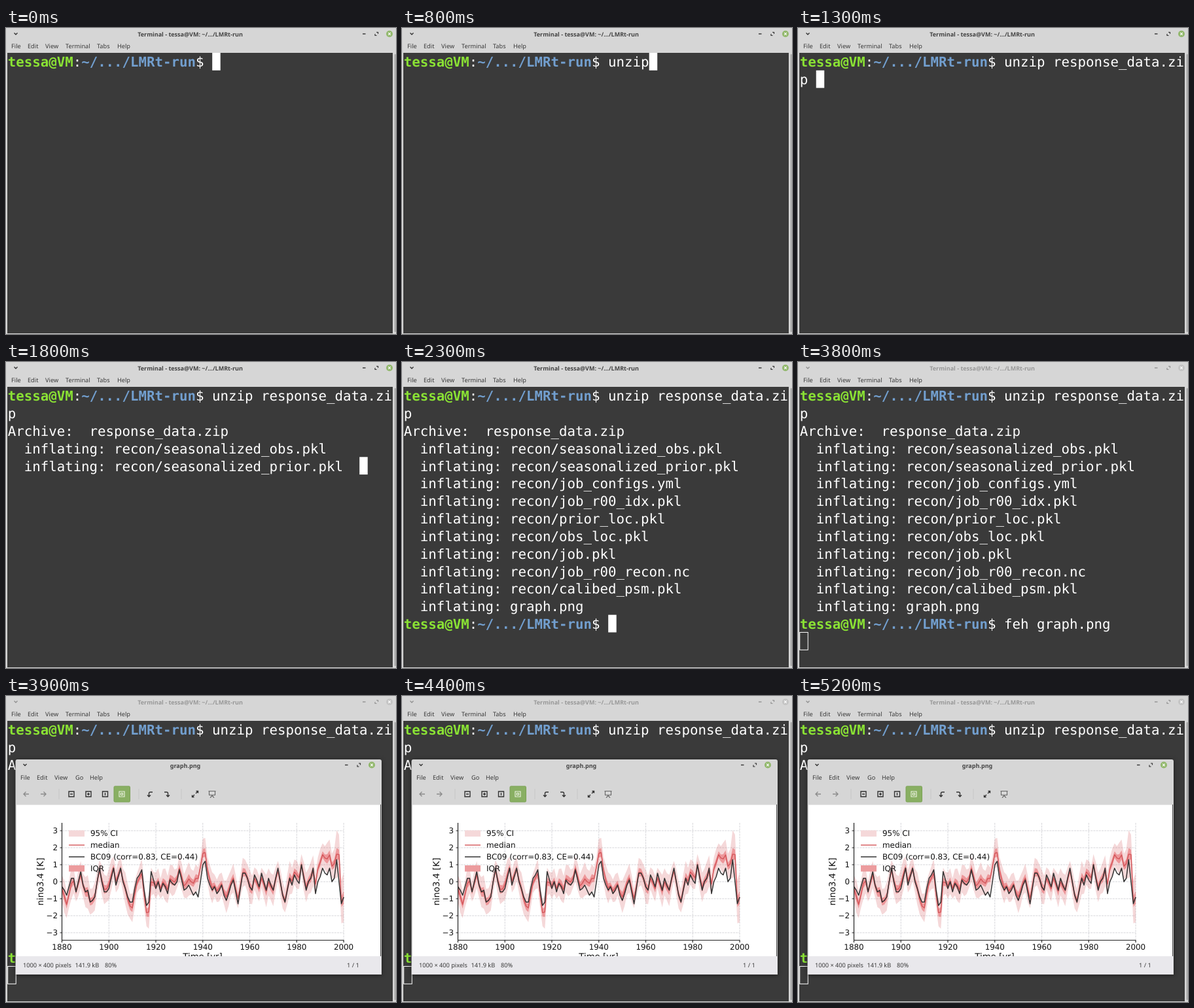
Recreate the animation shown at these times as an HTML page. Size 596 px wide and 468 px high, loop 5.3 s.

```html
<!DOCTYPE html>
<html lang="en">
<head>
<meta charset="utf-8">
<title>Terminal session</title>
<style>
html, body { margin: 0; width: 100%; height: 100%; overflow: hidden; background: #d6d6d6; }
svg { display: block; width: 596px; height: 468px; text-rendering: geometricPrecision; }
text { white-space: pre; }
.ui { font: 9.2px "Noto Sans", "Open Sans", sans-serif; fill: #3a3a3a; }
.title { font-size: 9px; font-weight: 600; text-anchor: middle; fill: #444; }
.term { font: 20.765px "DejaVu Sans Mono", monospace; fill: #fff; }
.b { font-weight: 700; }
.plot { font: 11.9px "DejaVu Sans", sans-serif; fill: #111; }
.axis { font-size: 13.3px; text-anchor: middle; }
.icon { fill: none; stroke: #333; stroke-width: 1.4; }
</style>
</head>
<body>
<svg id="stage" viewBox="0 0 596 468"></svg>
<script>
const LOOP = 5300, COL = 12.5, ROW = 26.82, LEFT = 2.7, TOP = 38;
const USER = 'tessa@VM', DIR = '~/.../LMRt-run';
const stage = document.getElementById('stage');

const text = (x, y, s, cls, more = '') => `<text x="${x}" y="${y}" class="${cls}" ${more}>${s}</text>`;
const rect = (x, y, w, h, fill, more = '') =>
  `<rect x="${x}" y="${y}" width="${w}" height="${h}" fill="${fill}" ${more}/>`;
const path = (d, more) => `<path d="${d}" ${more}/>`;
const icon = (d, more = '') => path(d, `class="icon" ${more}`);

// Title bar controls; cx is the centre of the close button.
function controls(left, cx, y) {
  return icon(`M${left - 2.5} ${y - 1.5}l2.5 2.5l2.5 -2.5`) +
    icon(`M${cx - 41} ${y}h4.5`) +
    icon(`M${cx - 20} ${y - 2.5}h2.5v2.5M${cx - 22} ${y}v2.5h2.5`, 'style="stroke-width:1.2"');
}
const closeButton = (cx, y, fill) => `<circle cx="${cx}" cy="${y}" r="5" fill="${fill}"/>` +
  icon(`M${cx - 1.8} ${y - 1.8}l3.6 3.6m0 -3.6l-3.6 3.6`, 'style="stroke:#fff;stroke-width:1.2"');

const menu = (items, y) => items.map(([x, s]) => text(x, y, s, 'ui')).join('');

function terminal() {
  return rect(0, 0, 596, 468, '#d6d6d6') + rect(2, 38, 589, 429, '#3a3a3a') +
    rect(593.5, 40, 2.5, 425, '#acacac', 'rx="1"') +
    `<g id="bar">${text(281.5, 12.6, `Terminal - ${USER}: ${DIR}`, 'ui title')}${controls(15, 586, 9)}</g>` +
    `<g id="active">${closeButton(586, 9, '#92b86c')}</g>` +
    `<g id="inactive">${closeButton(586, 9, '#c4c4c4')}</g>` +
    menu([[8, 'File'], [33, 'Edit'], [60, 'View'], [91, 'Terminal'], [139, 'Tabs'], [170, 'Help']], 31) +
    '<g id="rows"></g><rect id="cursor" stroke="#fff"/>';
}

// ---- chart: yearly values in tenths from 1880 ----
const px = i => 85.5 + i * 3.588, py = v => 284 - v * 26;
const OBS = [
  -3, -5, -8, -3, 2, 2, -6, 0, 6, -2, -6, -5, -12, -11, -9, 0, 8, 0, -6, -6,
  -4, 2, 8, -2, 3, 8, 0, -4, -9, -12, -12, -4, 2, 4, 7, -5, -14, -12, 6, 1,
  -4, 0, -6, -1, -3, -7, 1, -1, -2, 0, 7, 1, -5, -4, -2, -5, -8, -6, -9, 0,
  10, 12, 2, -2, -5, -3, -7, -5, -2, -8, -11, -7, -2, 1, -6, -13, -4, 5, 5, 2,
  -3, -5, 4, 1, -3, 5, 0, -5, 2, -2, -5, 2, 8, 0, -8, -12, -5, 2, -2, 4,
  1, -1, 10, 2, -5, 0, 2, 8, -7, 0, 3, 8, 5, 4, 8, 0, 2, 13, 0, -13, -9
].map(v => v / 10);
const SHIFT = [[0, -.1], [2, -.6], [5, -.1], [16, 0], [20, .2], [27, 0], [30, -.4], [34, -.1],
  [37, -.7], [40, .1], [52, .2], [55, .5], [58, 1], [61, .6], [64, .1], [75, .2], [84, -.2],
  [95, 0], [100, .3], [103, .1], [107, 0], [109, .8], [113, .9], [116, .8], [117, .5],
  [118, 1.6], [119, 0], [120, 0]];

function shift(i) {
  const k = Math.max(1, SHIFT.findIndex(p => p[0] >= i));
  const [x0, y0] = SHIFT[k - 1], [x1, y1] = SHIFT[k];
  return y0 + (y1 - y0) * (i - x0) / (x1 - x0);
}
const median = OBS.map((v, i) =>
  .85 * v + .075 * ((OBS[i - 1] ?? v) + (OBS[i + 1] ?? v)) + shift(i));

const line = vals => 'M' + vals.map((v, i) => `${px(i).toFixed(1)} ${py(v).toFixed(1)}`).join('L');
function band(half) {
  const up = median.map((v, i) => [px(i), py(v + half(i))]);
  const down = median.map((v, i) => [px(i), py(v - half(i))]).reverse();
  return 'M' + [...up, ...down].map(p => p.map(n => n.toFixed(1)).join(' ')).join('L') + 'Z';
}
const wobble = i => Math.sin(i * 1.9) * .12 + Math.sin(i * .73) * .1;
const wide = i => .78 + wobble(i) + (i > 116 ? .6 : 0);
const narrow = i => .23 + wobble(i) * .3 + (i > 116 ? .12 : 0);

function chart() {
  let grid = '', ticks = '', labels = '';
  for (let yr = 1880; yr <= 2000; yr += 20) {
    const x = px(yr - 1880);
    grid += `M${x} 194V373`;
    ticks += `M${x} 373.5v3.5`;
    labels += text(x, 388.2, yr, 'plot', 'text-anchor="middle"');
  }
  for (let v = -3; v <= 3; v++) {
    grid += `M86 ${py(v)}H516`;
    ticks += `M85.5 ${py(v)}h-3`;
    labels += text(79, py(v) + 4.4, String(v).replace('-', '\u2212'), 'plot', 'text-anchor="end"');
  }
  const legend = ['95% CI', 'median', 'BC09 (corr=0.83, CE=0.44)', 'IQR']
    .map((s, i) => text(129, 214.4 + i * 17.9, s, 'plot')).join('');
  return path(grid, 'fill="none" stroke="#d2d2d6" stroke-width=".9" stroke-dasharray="3 1.2"') +
    path(band(wide), 'fill="#cd3c40" fill-opacity=".2"') +
    path(band(narrow), 'fill="#e2484c" fill-opacity=".45"') +
    path(line(median), 'fill="none" stroke="#d4565a" stroke-width="1.4" stroke-linejoin="round"') +
    path(line(OBS), 'fill="none" stroke="#333" stroke-width="1.5" stroke-linejoin="round"') +
    path('M85.5 194V373.5H516.5' + ticks, 'fill="none" stroke="#222" stroke-width="1.2"') + labels +
    rect(96, 205.5, 24, 9.5, '#f5d8d9') + rect(96, 259, 24, 9.5, '#ec9c9e') +
    path('M96 228H120', 'stroke="#d4565a" stroke-width="1.4"') +
    path('M96 246H120', 'stroke="#333" stroke-width="1.5"') + legend +
    text(0, 0, 'nino3.4 [K]', 'plot axis', 'transform="translate(57 284) rotate(-90)"') +
    text(300.5, 402.8, 'Time [yr]', 'plot axis');
}

function toolbar() {
  const box = x => `M${x - 4} 146h8v8h-8z`;
  const seps = [81, 203, 268].map(x => `M${x} 142v16`).join('');
  return rect(165, 138, 24.5, 24, '#89af63', 'rx="1.5" stroke="#7ba255"') +
    path(seps, 'stroke="#c6c6c6"') +
    icon('M35 150h-8m3.5 -3.5l-3.5 3.5l3.5 3.5M53 150h8m-3.5 -3.5l3.5 3.5l-3.5 3.5', 'style="stroke:#8c8c8c"') +
    icon(box(100) + 'M98 150h4' + box(126) + 'M124 150h4m-2 -2v4' + box(151.5) + 'M151.5 148v4') +
    icon(box(177) + 'M175.5 148.5h3v3h-3z', 'style="stroke:#eef4e6;stroke-width:1.1"') +
    icon('M224 147h-3.5q-2 0 -2 2v5m-2.5 -2.5l2.5 2.5l2.5 -2.5') +
    icon('M242 147h3.5q2 0 2 2v5m-2.5 -2.5l2.5 2.5l2.5 -2.5') +
    icon('M290 149l3.5 -3.5m-3 0h3v3M288 151l-3.5 3.5m3 0h-3v-3') +
    icon('M309.5 145.5h11m-10 0v6h9v-6m-4.5 6v2m0 -1l-3 3m3 -3l3 3', 'style="stroke:#666;stroke-width:1.1"');
}

function viewer() {
  return '<g id="viewer"><g style="filter:drop-shadow(0 1px 3px rgba(0,0,0,.5))">' +
    path('M14.5 426V100q0 -3 3 -3H571q3 0 3 3V426Z', 'fill="#d6d6d6"') + '</g>' +
    rect(15, 398, 558.5, 27.5, '#e9e8ec') + rect(16, 166.5, 556, 231.5, '#fff') +
    path('M572.5 166V398', 'stroke="#444"') +
    text(274, 109.5, 'graph.png', 'ui title') + controls(29, 559, 105.5) + closeButton(559, 105.5, '#92b86c') +
    menu([[22, 'File'], [47, 'Edit'], [74, 'View'], [106, 'Go'], [128, 'Help']], 128) +
    toolbar() +
    `<clipPath id="page">${rect(16, 166, 556, 232, '#fff')}</clipPath><g clip-path="url(#page)">${chart()}</g>` +
    menu([[26, '1000 × 400 pixels'], [105.5, '141.9 kB'], [151, '80%'], [521, '1 / 1']], 414.8) + '</g>';
}

// ---- terminal session ----
const FILES = ['seasonalized_obs.pkl', 'seasonalized_prior.pkl', 'job_configs.yml', 'job_r00_idx.pkl',
  'prior_loc.pkl', 'obs_loc.pkl', 'job.pkl', 'job_r00_recon.nc', 'calibed_psm.pkl']
  .map(f => 'recon/' + f).concat('graph.png');
const PROMPT = `<tspan class="b" fill="#8ae234">${USER}</tspan>:<tspan class="b" fill="#729fcf">${DIR}</tspan>$ `;
const INDENT = 25;

// Typed letter by letter from start, then completed at done.
const typed = (t, start, done, s) =>
  t >= done ? s : s.slice(0, Math.max(0, Math.floor((t - start) / 100) + 1));

function session(t) {
  const cmd = typed(t, 400, 1300, 'unzip response_data.zip');
  const rows = [PROMPT + cmd.slice(0, 22)];
  let row = 0, col = INDENT + cmd.length;
  if (t >= 1300) { rows.push(cmd.slice(22)); row = 1; col = 2; }
  if (t >= 1400) {
    const count = t < 1500 ? 1 : t < 1900 ? 2 : t < 2000 ? 6 : t < 2200 ? 8 : 10;
    rows.push('Archive:  response_data.zip');
    for (const f of FILES.slice(0, count)) rows.push('  inflating: ' + f);
    row = rows.length - 1;
    col = rows[row].length + 2;
  }
  if (t >= 2200) {
    const view = typed(t, 2400, 3000, 'feh graph.png');
    rows.push(PROMPT + view);
    row = 13; col = INDENT + view.length;
  }
  if (t >= 3300) { row = 14; col = 0; }
  return { rows, row, col };
}

stage.innerHTML = terminal() + viewer();
const $ = id => document.getElementById(id);
const set = (id, attrs) => { for (const k in attrs) $(id).setAttribute(k, attrs[k]); };
const show = (id, on) => set(id, { visibility: on ? 'visible' : 'hidden' });
let shown = '';

function draw(t) {
  const { rows, row, col } = session(t);
  const html = rows.map((s, i) => text(LEFT, (59.3 + i * ROW).toFixed(2), s, 'term')).join('');
  if (html !== shown) $('rows').innerHTML = shown = html;
  const away = t >= 3600;
  set('cursor', {
    x: LEFT + col * COL, y: TOP + row * ROW, width: COL, height: ROW,
    fill: away ? 'none' : '#fff', 'stroke-width': away ? 1 : 0
  });
  set('bar', { opacity: away ? .42 : 1 });
  show('active', !away);
  show('inactive', away);
  show('viewer', t >= 3900);
}

const begin = performance.now();
function tick() {
  draw((performance.now() - begin) % LOOP);
  requestAnimationFrame(tick);
}
tick();
</script>
</body>
</html>
```
